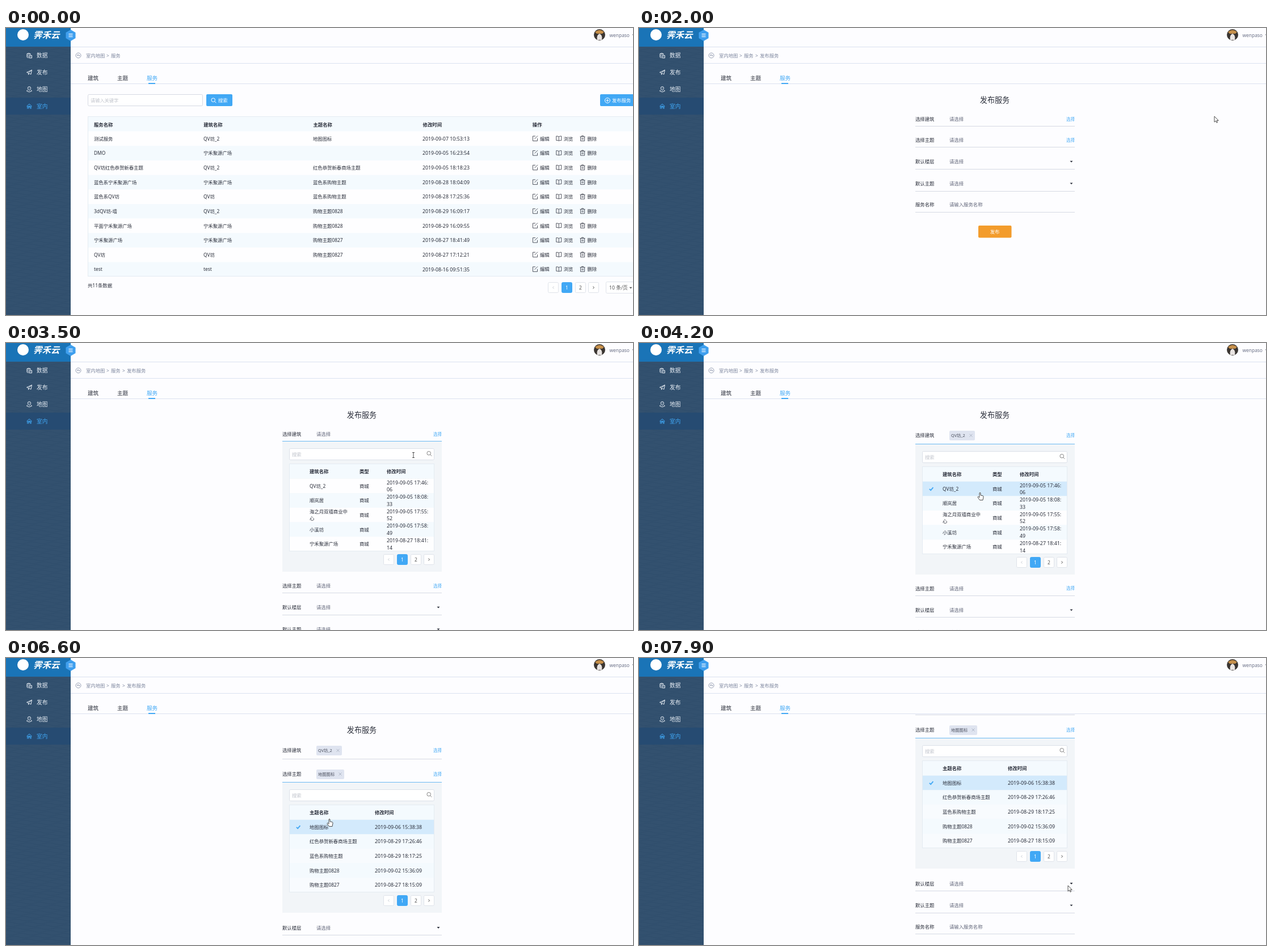
Animation, 1105 px wide and 507 px high, one loop 8000 ms. Source, as an HTML page with a canvas:

```html
<!DOCTYPE html>
<html lang="zh-CN">
<head>
<meta charset="utf-8">
<style>
html, body { margin: 0; width: 100%; height: 100%; overflow: hidden; background: #fdfdff; }
canvas { display: block; }
</style>
</head>
<body>
<canvas id="stage" width="1105" height="507" lang="zh-CN"></canvas>
<script>
const ctx = document.getElementById('stage').getContext('2d');
const BLUE = '#41a8f5', INK = '#2a2e3a', LINE = '#d5d9e3', STRIPE = '#f4fafe';
const FONT = '"Noto Sans", "Noto Sans CJK SC", "Noto Sans CJK", sans-serif';
const CIRCLE = 'M9.5 5A4.5 4.5 0 1 1 .5 5A4.5 4.5 0 1 1 9.5 5';

// Icons live in a 10 by 10 box
const ICONS = {
  data: 'M1 2Q4 .2 7 2V4M1 2V8Q2 9 4 9M1 5Q2 6 4 6M1 2Q4 3.8 7 2M5 5H9.5V9.5H5ZM6.5 7.2H8',
  plane: 'M.5 5L9.5 .8L8 8.5L5 6.8L3.5 9V6L9.5 .8M.5 5L3.5 6',
  pin: 'M5 7Q2.3 4.5 2.3 3A2.7 2.7 0 0 1 7.7 3Q7.7 4.5 5 7M5 2.5V3.5M2 6L.5 8L5 9.7L9.5 8L8 6',
  home: 'M.5 5L5 1L9.5 5M1.8 4.5V9.5M8.2 4.5V9.5M3.5 9.5V6.5H6.5V9.5M5 3.5V5M2 5.5H8',
  back: CIRCLE + 'M7 6.5V4.5H3M4.5 3L3 4.5L4.5 6',
  plus: CIRCLE + 'M5 2.5V7.5M2.5 5H7.5',
  search: 'M7.5 4.2A3.3 3.3 0 1 1 .9 4.2A3.3 3.3 0 1 1 7.5 4.2M6.6 6.6L9.3 9.3',
  edit: 'M5.5 1H1V9.5H9V5M4 6L9.5 .5',
  book: 'M5 2V9M5 2Q3 .8 .5 1V8.5Q3 8.3 5 9.3Q7 8.3 9.5 8.5V1Q7 .8 5 2',
  trash: 'M.5 2H9.5M3.5 2V.5H6.5V2M1.5 2V9.5H8.5V2M4 4V7.5M6 4V7.5',
  left: 'M6 3L4 5L6 7',
  right: 'M4 3L6 5L4 7',
  close: 'M2.5 2.5L7.5 7.5M7.5 2.5L2.5 7.5',
  check: 'M1.8 5.2L4.2 7.6L8.4 2.6',
};
const CURSORS = {
  arrow: 'M0 0V10.2L2.4 8L4 11.4L5.6 10.7L4.1 7.4H7.2Z',
  hand: 'M-1 1Q0 -.6 1 1V5L5 5.8Q6.2 6.2 6 8L5 13.5H-.5L-4 8.5Q-4 6.8 -2.4 7.6L-1 9Z',
  ibeam: 'M-2 -4.5H2M0 -4.5V4.5M-2 4.5H2',
};

const parseRows = s => s.split('\n').map(row => row.split('|'));

const services = parseRows(`测试服务|QV坊_2|地图图标|2019-09-07 10:53:13
DMO|宁禾聚源广场||2019-09-05 16:23:54
QV坊红色恭贺新春主题|QV坊_2|红色恭贺新春商场主题|2019-09-05 18:18:23
蓝色系宁禾聚源广场|宁禾聚源广场|蓝色系购物主题|2019-08-28 18:04:09
蓝色系QV坊|QV坊|蓝色系购物主题|2019-08-28 17:25:36
3dQV坊-墙|QV坊_2|购物主题0828|2019-08-29 16:09:17
平面宁禾聚源广场|宁禾聚源广场|购物主题0828|2019-08-29 16:09:55
宁禾聚源广场|宁禾聚源广场|购物主题0827|2019-08-27 18:41:49
QV坊|QV坊|购物主题0827|2019-08-27 17:12:21
test|test||2019-08-16 09:51:35`);

const buildings = {
  columns: [['建筑名称', 535], ['类型', 623], ['修改时间', 671]],
  plain: '#fefeff',
  rows: parseRows(`QV坊_2|商城|2019-09-05 17:46:/06
顺岚居|商城|2019-09-05 18:08:/33
海之月双禧商业中/心|商城|2019-09-05 17:55:/52
小溪坊|商城|2019-09-05 17:58:/49
宁禾聚源广场|商城|2019-08-27 18:41:/14`),
};
const themes = {
  columns: [['主题名称', 535], ['修改时间', 650]],
  plain: '#f8fbfe',
  rows: parseRows(`地图图标|2019-09-06 15:38:38
红色恭贺新春商场主题|2019-08-29 17:26:46
蓝色系购物主题|2019-08-29 18:17:25
购物主题0828|2019-09-02 15:36:09
购物主题0827|2019-08-27 18:15:09`),
};

function text(s, x, y, { size = 8.4, color = INK, weight = '', align = 'left' } = {}) {
  ctx.font = `${weight} ${size}px ${FONT}`;
  ctx.fillStyle = color;
  ctx.textAlign = align;
  ctx.fillText(s, x, Math.round(y + size * 0.37));
}

function cell(s, x, y) {
  const lines = s.split('/');
  const size = s.startsWith('20') ? 8.8 : 8.4;
  lines.forEach((part, i) => text(part, x, y + (i - (lines.length - 1) / 2) * 12.6, { size }));
}

function rect(x, y, w, h, color) {
  ctx.fillStyle = color;
  ctx.fillRect(x, y, w, h);
}

function box(x, y, w, h, fill, border) {
  ctx.beginPath();
  ctx.roundRect(x, y, w, h, 2);
  ctx.fillStyle = fill;
  ctx.fill();
  if (!border) return;
  ctx.strokeStyle = border;
  ctx.lineWidth = 1;
  ctx.stroke();
}

function disc(x, y, r, color) {
  ctx.beginPath();
  ctx.arc(x, y, r, 0, 7);
  ctx.fillStyle = color;
  ctx.fill();
}

function shape(d, x, y, fill, stroke, width = 0.8) {
  const path = new Path2D(d);
  ctx.save();
  ctx.translate(x, y);
  if (fill) { ctx.fillStyle = fill; ctx.fill(path); }
  if (stroke) { ctx.strokeStyle = stroke; ctx.lineWidth = width; ctx.stroke(path); }
  ctx.restore();
}

const icon = (name, x, y, color = INK, width) => shape(ICONS[name], x - 5, y - 5, null, color, width);
const caret = (x, y, color = INK) => shape('M-2.5 -1.3H2.5L0 1.5Z', x, y, color);

function pager(x, top) {
  for (let i = 0; i < 4; i++) {
    const left = Math.round(x + i * 23.8), active = i === 1;
    const cx = left + 9.5, cy = top + 9.5;
    box(left + 0.5, top + 0.5, 18, 18, active ? BLUE : '#fff', active ? BLUE : '#dfe3ea');
    if (i === 0) icon('left', cx, cy, '#b8bdc8');
    else if (i === 3) icon('right', cx, cy, '#444', 1);
    else text(String(i), cx, cy, { color: active ? '#fff' : '#555', align: 'center' });
  }
}

function drawFrame(form) {
  rect(0, 0, 1105, 507, '#fdfdff');
  for (const y of [33, 62, 98]) rect(114, y, 991, 1, '#dbe1f0');
  rect(0, 33, 114, 474, '#33516f');
  ctx.strokeStyle = 'rgba(15,45,80,.09)';
  ctx.lineWidth = 1;
  for (let y = 38; y < 507; y += 5) {
    ctx.beginPath();
    for (let x = 0; x <= 114; x += 3) ctx.lineTo(x, y + 1.5 * Math.sin(x / 6 + y * 1.7));
    ctx.stroke();
  }
  rect(0, 0, 114, 33, '#1a74b7');
  disc(30, 12, 10, '#fff');
  text('霁禾云', 48, 12.5, { size: 15.5, color: '#fff', weight: 'italic bold' });
  shape('M0 -10L8.5 -5V5L0 10L-8.5 5V-5Z', 114, 13, '#3f9fee');
  shape('M-3.5 -2.5H3.5M-3.5 0H3.5M-3.5 2.5H3.5', 114, 13, null, '#fff', 1.1);

  rect(0, 123, 114, 30, '#264b72');
  [['data', '数据'], ['plane', '发布'], ['pin', '地图'], ['home', '室内']].forEach(([name, label], i) => {
    const y = 48.5 + i * 29.9, color = i === 3 ? BLUE : '#e8eef5';
    icon(name, 41, y, color, 1);
    text(label, 54, y, { size: 9.7, color });
  });

  disc(1046, 12, 10, '#3a3532');
  shape('M-8 -5Q0 -12 8 -5L5 -2H-5Z', 1046, 12, '#c58f4a');
  shape('M-4 9Q-6 1 0 -2Q6 1 4 9Z', 1046, 12, '#e9e4e2');
  text('wenpaso', 1063.5, 12.5, { size: 8.4, color: '#6b7187' });
  caret(1106, 12.5, '#6b7187');

  const crumbs = [['室内地图', 141], ['>', 177], ['服务', 185]];
  if (form) crumbs.push(['>', 205], ['发布服务', 213]);
  icon('back', 127.5, 48.5, '#7c869f');
  for (const [s, x] of crumbs) text(s, x, 48.5, { color: '#7f889f' });

  [['建筑', 144], ['主题', 196], ['服务', 248]].forEach(([s, x], i) =>
    text(s, x, 88.5, { size: 9.6, color: i === 2 ? BLUE : INK }));
  rect(251, 97, 12, 2, BLUE);
}

function drawList() {
  box(144.5, 117.5, 202, 20, '#fff', LINE);
  text('请输入关键字', 149, 128, { size: 8.2, color: '#c0c4cc' });
  box(353, 117, 46, 21, BLUE);
  icon('search', 366, 128, '#fff', 1);
  text('搜索', 374, 128, { color: '#fff' });
  box(1047, 117, 64, 21, BLUE);
  icon('plus', 1060, 128, '#fff', 1);
  text('发布服务', 1068, 128, { color: '#fff' });

  const columns = [155, 348, 541, 734];
  rect(144, 156, 961, 26.5, STRIPE);
  ['服务名称', '建筑名称', '主题名称', '修改时间', '操作'].forEach((s, i) =>
    text(s, 155 + i * 193.2, 170.5, { weight: 'bold' }));
  services.forEach((row, i) => {
    const y = 195.5 + i * 25.65;
    rect(144, y - 12.8, 961, 25.65, i % 2 ? STRIPE : '#fefeff');
    row.forEach((s, k) => cell(s, columns[k], y));
    [['edit', '编辑'], ['book', '浏览'], ['trash', '删除']].forEach(([name, label], k) => {
      icon(name, 932.5 + k * 41.8, y - 0.5);
      text(label, 941 + k * 41.7, y);
    });
  });
  ctx.strokeStyle = '#e4ebf2';
  ctx.lineWidth = 1;
  ctx.strokeRect(144.5, 156.5, 970, 282);
  text('共11条数据', 144, 455);
  pager(955, 449);
  box(1057.5, 448.5, 60, 20, '#fff', '#dfe3ea');
  text('10 条/页', 1063, 459, { size: 8.7, color: '#555' });
  caret(1101, 459, '#555');
}

function drawPanel(table, top, chosen, loading) {
  const edge = top + 39.5;
  rect(487, top, 281, loading ? 507 : 230, '#f2f5f8');
  box(499.5, top + 12.5, 255, 20, '#fff', '#dbe0e8');
  text('搜索', 504, top + 23, { color: '#c0c4cc' });
  icon('search', 746, top + 21.5, '#666');
  ctx.strokeStyle = '#e4ebf2';
  if (loading) {
    rect(499.5, edge, 255, 507, '#f8f9fb');
    ctx.strokeRect(499.5, edge, 255, 507);
    ['2', '0', '1', '9', '-', '0', '9', '-', '0', '6', '1', '5:', '3', '8:', '3', '8'].forEach((s, i) =>
      text(s, 534.5, top + 95.5 + i * 12.55, { size: 8.8 }));
    [...'地图图标'].forEach((s, i) => text(s, 534.5, top + 171 + i * 12.55));
    return;
  }
  rect(499.5, edge, 255, 26, STRIPE);
  for (const [s, x] of table.columns) text(s, x, top + 53.3, { weight: 'bold' });
  table.rows.forEach((row, i) => {
    const y = top + 78.6 + i * 25.6, picked = chosen && i === 0;
    rect(499.5, y - 12.8, 255, 25.6, picked ? '#d3eafc' : i % 2 ? STRIPE : table.plain);
    if (picked) icon('check', 515, y, BLUE, 1.8);
    row.forEach((s, k) => cell(s, table.columns[k][1], y));
  });
  ctx.lineWidth = 1;
  ctx.strokeRect(499.5, edge, 255, 154);
  pager(665, top + 199);
}

function drawTag(s, width, y) {
  box(547, Math.round(y - 8.5), width, 17, '#dfe4f0');
  text(s, 550, y, { size: 7.3, color: '#4a4f5e' });
  icon('close', 547 + width - 7, y, '#a3abbd');
}

function drawForm(t) {
  const scroll = t < 7200 ? 0 : t < 7300 ? 39 : 78;
  const fields = [
    { label: '选择建筑', y: 161, line: 173, table: buildings, open: t >= 3300 && t < 5400, tag: t >= 4000 && 'QV坊_2', width: 45 },
    { label: '选择主题', y: 198, line: 210, table: themes, open: t >= 5400, tag: t >= 6600 && '地图图标', width: 49, loading: t < 5800 },
    { label: '默认楼层', y: 236, line: 248.5 },
    { label: '默认主题', y: 274.7, line: 287.5 },
    { label: '服务名称', y: 312.3, line: 324.5 },
  ];
  ctx.save();
  ctx.beginPath();
  ctx.rect(115, 99, 990, 408);
  ctx.clip();
  ctx.translate(0, -scroll);
  text('发布服务', 627, 127.5, { size: 13.1, align: 'center' });
  let shift = 0;
  fields.forEach((f, i) => {
    const y = f.y + shift + (f.tag ? 2.3 : 0);
    if (f.tag) shift += 4.7;
    const line = Math.round(f.line + shift);
    text(f.label, 487, y);
    if (f.tag) drawTag(f.tag, f.width, y);
    else text(i === 4 ? '请输入服务名称' : '请选择', 547, y, { color: '#62677a' });
    if (f.table) text('选择', 753, y, { size: 7.5, color: BLUE });
    else if (i < 4) caret(762, y);
    if (f.open) {
      drawPanel(f.table, line + 1, f.tag, f.loading);
      shift += f.loading ? 507 : 231;
    }
    rect(487, line, 281, 1, f.open ? '#6bb9f2' : LINE);
  });
  box(598, 349 + shift, 58.5, 21.5, '#f39c2c');
  text('发布', 627, 360 + shift, { color: '#fff', align: 'center' });
  ctx.restore();
}

// time, x, y, pointer shape from that time on
const path = [
  [1100, 1098, 192, 'arrow'], [1600, 1062, 135, 'hand'], [1900, 1055, 133, 'hand'],
  [2000, 1014, 156, 'arrow'], [2300, 888, 200, 'arrow'], [2600, 800, 204, 'arrow'],
  [2800, 764, 172, 'hand'], [2900, 763, 165, 'hand'], [3300, 763, 165, 'hand'],
  [3500, 718, 198, 'ibeam'], [3700, 650, 232, 'arrow'], [3900, 601, 264, 'hand'],
  [4300, 601, 264, 'hand'], [4400, 620, 285, 'arrow'], [5000, 758, 431, 'hand'],
  [5400, 758, 431, 'hand'], [5500, 745, 400, 'arrow'], [5700, 706, 314, 'arrow'],
  [6200, 640, 299, 'hand'], [6400, 570, 284, 'hand'], [6600, 570, 284, 'hand'],
  [7000, 714, 331, 'hand'], [7500, 714, 331, 'arrow'], [7900, 756, 402, 'arrow'],
];

function drawCursor(t) {
  if (t < path[0][0]) return;
  const i = path.findLastIndex(key => key[0] <= t);
  const [t0, x0, y0, kind] = path[i];
  const [t1, x1, y1] = path[i + 1] || path[i];
  const k = t1 > t0 ? (t - t0) / (t1 - t0) : 0;
  shape(CURSORS[kind], x0 + (x1 - x0) * k, y0 + (y1 - y0) * k, kind === 'ibeam' ? null : '#fff', '#222');
}

function draw(now) {
  const t = Math.floor(now % 8000 / 100) * 100;
  const form = t >= 2000;
  drawFrame(form);
  if (form) drawForm(t);
  else drawList();
  drawCursor(t);
}

function tick() {
  draw(performance.now());
  requestAnimationFrame(tick);
}
tick();
</script>
</body>
</html>
```
